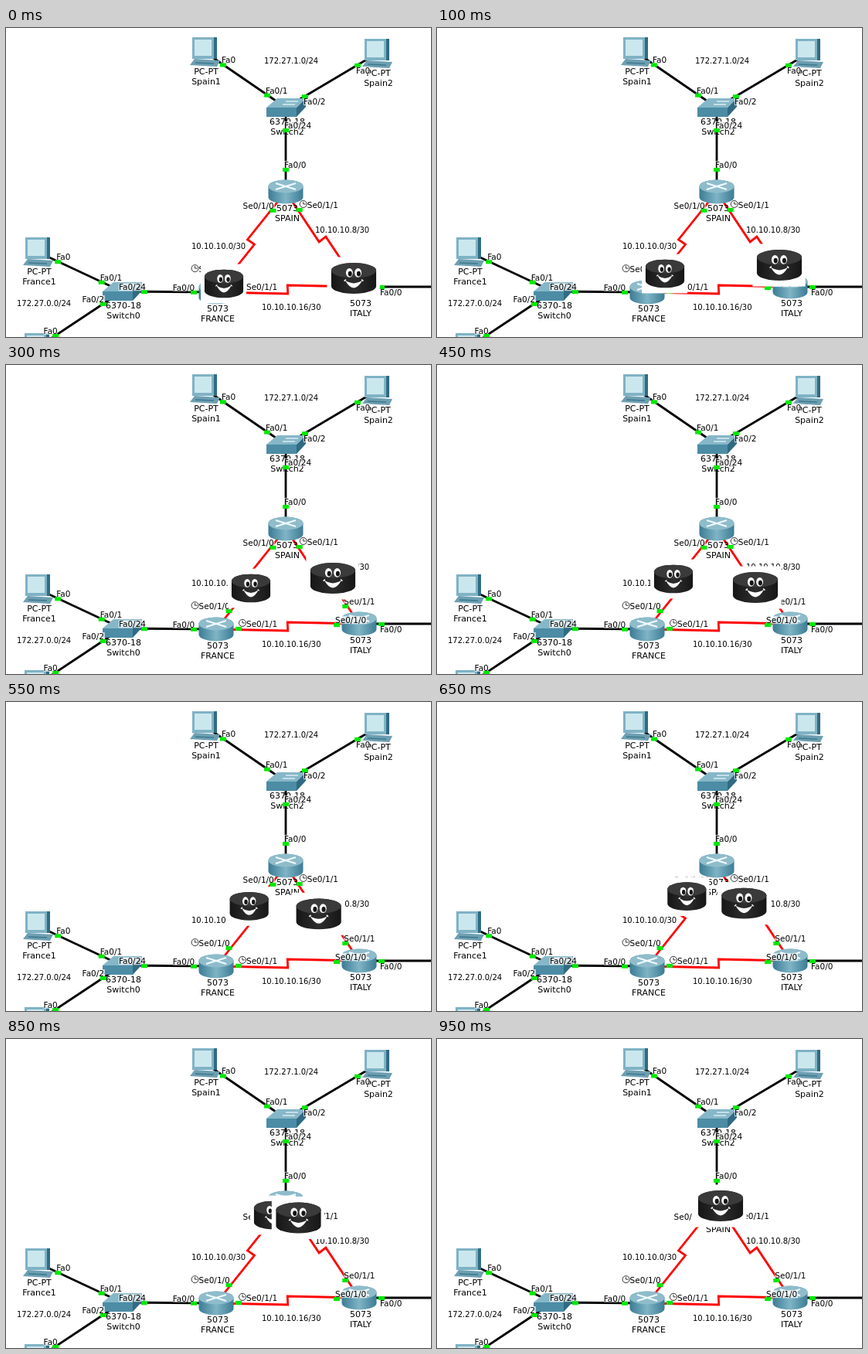
An HTML page with a canvas that plays this animation: 550 by 400 pixels, repeating every 1 s.

```html
<!DOCTYPE html>
<html lang="en">
<head>
<meta charset="utf-8">
<title>Network loop</title>
<style>
html, body { margin: 0; width: 100%; height: 100%; overflow: hidden; background: #fff; }
canvas { display: block; }
</style>
</head>
<body>
<canvas id="stage" width="550" height="400"></canvas>
<script>
const c = document.getElementById('stage').getContext('2d');

function trace(points) {
  c.beginPath();
  points.forEach(([x, y]) => c.lineTo(x, y));
}

function poly(points, fill) {
  trace(points);
  c.fillStyle = fill;
  c.fill();
}

function line(points, color, width) {
  trace(points);
  c.strokeStyle = color;
  c.lineWidth = width;
  c.stroke();
}

function oval(x, y, rx, ry, fill) {
  c.beginPath();
  c.ellipse(x, y, rx, ry, 0, 0, 7);
  c.fillStyle = fill;
  c.fill();
}

function box(x, y, w, h, fill) {
  c.fillStyle = fill;
  c.fillRect(x, y, w, h);
}

// Cylinder around the origin: rim radii, half height, edge, middle and lid colours
function drum(rx, ry, h, edge, middle, lid) {
  const side = c.createLinearGradient(-rx, 0, rx, 0);
  [edge, middle, edge].forEach((k, i) => side.addColorStop(i / 2, k));
  c.beginPath();
  c.ellipse(0, -h, rx, ry, 0, Math.PI, 0);
  c.ellipse(0, h, rx, ry, 0, 0, Math.PI);
  c.fillStyle = side;
  c.fill();
  oval(0, -h, rx, ry, lid);
}

function text(s, x, y, size, align = 'left') {
  c.font = size + 'px "DejaVu Sans", Verdana, sans-serif';
  c.textAlign = align;
  c.fillStyle = '#000';
  c.fillText(s, x, y);
}

function pc() {
  poly([[-19, 17], [-13, 9], [20, 11], [16, 19]], '#6d9fb2');
  box(-16, -19, 32, 28, '#2f6c83');
  box(-16, -19, 28, 28, '#7fb2c4');
  box(-13, -16, 22, 21, '#cbe7ee');
  line([[-12, 14], [12, 15]], '#3f788d', 1.5);
}

function hub() {
  poly([[-25, 0], [-11, -12], [26, -12], [14, 0]], '#86b7c8');
  box(-25, 0, 39, 12, '#4c8ca5');
  poly([[26, -12], [26, -1], [14, 12], [14, 0]], '#2f6b83');
  for (const y of [-8, -4]) line([[-8 - y, y], [8 - y, y]], '#e8f5fa', 1.3);
}

function router() {
  drum(22.5, 8.5, 7, '#3c7c94', '#7fb4c6', '#8ebccb');
  for (const s of [-1, 1]) line([[-13 * s, -11], [13 * s, -3]], '#f0fafd', 2);
}

function puck() {
  drum(28.5, 9.5, 10, '#161616', '#2d2d2d', '#3a3a3a');
  for (const x of [-5.5, 5.5]) {
    oval(x, -7, 4.4, 5.8, '#fff');
    oval(x + 0.8, -5.8, 2.5, 3.3, '#151515');
    line([[x * 2.2, 3.5], [x * 1.8, 1.5]], '#fff', 1.5);
  }
  c.beginPath();
  c.moveTo(-11, 2.5);
  c.quadraticCurveTo(0, 10, 11, 2.5);
  c.quadraticCurveTo(0, 22, -11, 2.5);
  c.fillStyle = '#fff';
  c.fill();
}

// Every device carries its model and name below the icon
const kinds = {
  pc: { draw: pc, model: 'PC-PT', gap: 29 },
  hub: { draw: hub, model: '6370-18', gap: 22 },
  router: { draw: router, model: '5073', gap: 25 }
};
const node = (kind, name, x, y) => ({ ...kinds[kind], name, x, y });

const pcA = node('pc', 'Spain1', 257, 31), pcB = node('pc', 'Spain2', 480, 33);
const pcC = node('pc', 'France1', 41, 290), pcD = node('pc', 'France2', 40, 414);
const hubA = node('hub', 'Switch2', 362, 103), hubB = node('hub', 'Switch0', 150, 341);
const spain = node('router', 'SPAIN', 362, 212), france = node('router', 'FRANCE', 272, 342);
const italy = node('router', 'ITALY', 457, 335), edge = { x: 600, y: 335 };
const nodes = [pcA, pcB, pcC, pcD, hubA, hubB, spain, france, italy];

const cables = [[pcA, hubA], [pcB, hubA], [hubA, spain], [pcC, hubB], [pcD, hubB],
  [hubB, france], [italy, edge]];
const serials = [[france, spain], [spain, italy], [france, italy]];

function heading(a, b) {
  const d = Math.hypot(b.x - a.x, b.y - a.y);
  return [(b.x - a.x) / d, (b.y - a.y) / d];
}

// Straight wire; a kink makes it jump sideways halfway
function wire(a, b, color, kink = 0) {
  const [u, v] = heading(a, b), mx = (a.x + b.x) / 2, my = (a.y + b.y) / 2;
  line([[a.x, a.y], [mx - v * kink, my + u * kink], [mx + v * kink, my - u * kink], [b.x, b.y]],
    color, 2.8);
}

function clock(x, y) {
  oval(x, y, 4.5, 4.5, '#fff');
  c.strokeStyle = '#333';
  c.lineWidth = 1;
  c.stroke();
  line([[x, y - 3], [x, y], [x + 3, y]], '#333', 1);
}

// Link light on the wire from a to b, with the port name beside it
function port(a, b, label, { right, below, timed } = {}) {
  const [u, v] = heading(a, b), x = a.x + 29 * u, y = a.y + 29 * v;
  const size = 10.5, w = label.length * 5.85;
  const left = right ? x + 2 - w : x + (timed ? 10 : -2);
  const base = y + (below ? 11 : -2);
  box(left, base - 9, w, 10, 'rgba(255,255,255,.7)');
  box(x - 4, y - 2, 8, 5, '#00e800');
  text(label, left, base, size);
  if (timed) clock(left - 5, base - 5);
}

function network() {
  box(0, 0, 550, 400, '#fff');
  cables.forEach(([a, b]) => wire(a, b, '#000'));
  serials.forEach(([a, b]) => wire(a, b, '#ff0000', 5.5));
  for (const n of nodes) {
    c.save();
    c.translate(n.x, n.y);
    n.draw();
    text(n.model, 2, n.gap, 11, 'center');
    text(n.name, 2, n.gap + 13, 11, 'center');
    c.restore();
  }

  port(pcA, hubA, 'Fa0');
  port(pcB, hubA, 'Fa0', { below: true });
  port(pcC, hubB, 'Fa0');
  port(pcD, hubB, 'Fa0', { right: true });
  port(hubA, pcA, 'Fa0/1');
  port(hubA, pcB, 'Fa0/2', { below: true });
  port(hubA, spain, 'Fa0/24');
  port(hubB, pcC, 'Fa0/1');
  port(hubB, pcD, 'Fa0/2', { right: true });
  port(hubB, france, 'Fa0/24', { right: true });
  port(spain, hubA, 'Fa0/0');
  port(france, hubB, 'Fa0/0', { right: true });
  port(italy, edge, 'Fa0/0', { below: true });
  port(france, spain, 'Se0/1/0', { right: true, timed: true });
  port(france, italy, 'Se0/1/1', { timed: true });
  port(spain, france, 'Se0/1/0', { right: true });
  port(spain, italy, 'Se0/1/1', { timed: true });
  port(italy, spain, 'Se0/1/1');
  port(italy, france, 'Se0/1/0');

  text('172.27.1.0/24', 334, 46, 10);
  text('172.27.0.0/24', 14, 360, 10);
  text('10.10.10.0/30', 240, 286, 10);
  text('10.10.10.8/30', 400, 265, 10);
  text('10.10.10.16/30', 331, 365, 10);
}

// Way points along the two serial wires, reached at the given steps
const steps = [0, 4, 6, 9, 15, 19];
const toSpain = [[282, 331], [308, 305], [317, 289], [306, 277], [332, 239], [360, 217]];
const fromItaly = [[450, 324], [436, 290], [423, 276], [412, 288], [390, 247], [367, 216]];

function along(path, step) {
  const i = Math.max(1, steps.findIndex(s => s >= step));
  const k = (step - steps[i - 1]) / (steps[i] - steps[i - 1]);
  return path[i].map((v, j) => path[i - 1][j] * (1 - k) + v * k);
}

// A puck on its white card
function token([x, y], sx, sy) {
  c.save();
  c.translate(x, y);
  c.scale(sx, sy);
  box(-34, -27, 67, 54, '#fff');
  puck();
  c.restore();
}

function frame(now) {
  const step = Math.floor(now % 1000 / 50);
  network();
  token(along(toSpain, step), 0.88, 0.94);
  token(along(fromItaly, step), 1.02, 1.02);
  requestAnimationFrame(frame);
}
frame(0);
</script>
</body>
</html>
```
